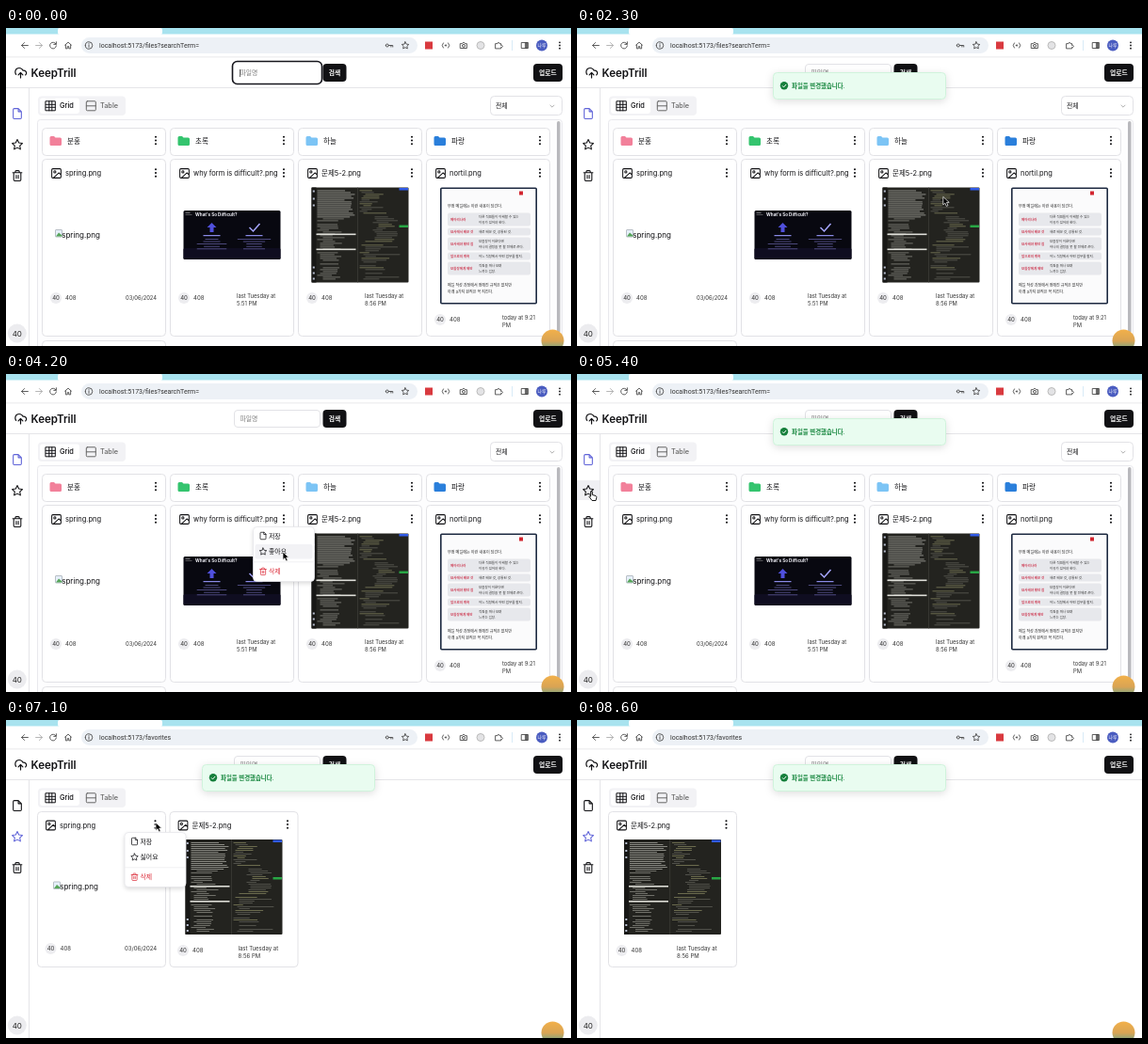
Recreate the animation shown at these times as an HTML page. Size 600x338 px, loop 9000 ms.

```html
<!DOCTYPE html>
<html lang="ko">
<head>
<meta charset="utf-8">
<title>Storage page</title>
<style>
html, body { margin: 0; width: 100%; height: 100%; overflow: hidden; background: #fff; }
svg { display: block; width: 600px; height: 338px; font-family: Inter, "Noto Sans CJK KR", "Noto Sans CJK", sans-serif; }
</style>
</head>
<body>
<svg id="stage" viewBox="0 0 600 338"></svg>
<script>
const LOOP = 9000, STEP = 100;
const INK = '#111114', LINE = '#e2e2e6', SOFT = '#f2f2f5', INDIGO = '#5f63d8', RED = '#dc2f3c';
const stage = document.getElementById('stage');

const rect = (x, y, w, h, fill, r = 0, stroke = 'none', sw = 1) =>
  `<rect x="${x}" y="${y}" width="${w}" height="${h}" rx="${r}" fill="${fill}" stroke="${stroke}" stroke-width="${sw}"/>`;
const circle = (x, y, r, fill, stroke = 'none') =>
  `<circle cx="${x}" cy="${y}" r="${r}" fill="${fill}" stroke="${stroke}"/>`;
const text = (x, y, s, size = 7.5, fill = INK, weight = 400, extra = '') =>
  `<text x="${x}" y="${y}" font-size="${size}" fill="${fill}" font-weight="${weight}" ${extra}>${s}</text>`;
const mid = 'text-anchor="middle"';
const group = (x, y, body, extra = '') => `<g transform="translate(${x} ${y})" ${extra}>${body}</g>`;

// Line icons on a 24 unit grid
const ICONS = {
  upload: 'M4 15a7 7 0 1 1 12-7h2a4.5 4.5 0 0 1 2.5 8M12 12v9M8 16l4-4 4 4',
  file: 'M14 2H6a2 2 0 0 0-2 2v16a2 2 0 0 0 2 2h12a2 2 0 0 0 2-2V8zV8h6',
  star: 'M12 2l3.1 6.3 6.9 1-5 4.9 1.2 6.8-6.2-3.2L5.8 21 7 14.2 2 9.3l6.9-1z',
  trash: 'M3 6h18M19 6v14a2 2 0 0 1-2 2H7a2 2 0 0 1-2-2V6M8 6V4a2 2 0 0 1 2-2h4a2 2 0 0 1 2 2v2M10 11v6M14 11v6',
  image: 'M5 3h14a2 2 0 0 1 2 2v14a2 2 0 0 1-2 2H5a2 2 0 0 1-2-2V5a2 2 0 0 1 2-2zM7 9a2 2 0 1 0 4 0a2 2 0 1 0-4 0M21 15l-4-4L6 21',
  grid: 'M2 2h20v20H2zM2 9h20M2 15h20M9 2v20M15 2v20',
  rows: 'M4 2h16a2 2 0 0 1 2 2v16a2 2 0 0 1-2 2H4a2 2 0 0 1-2-2V4a2 2 0 0 1 2-2zM2 12h20',
  down: 'M5 9l7 7 7-7',
  back: 'M21 12H3M11 4l-8 8 8 8',
  next: 'M3 12h18M13 4l8 8-8 8',
  reload: 'M20 8a9 9 0 1 0 1 5M21 2v7h-7',
  home: 'M3 11l9-8 9 8M5 10v11h5v-6h4v6h5V10',
  info: 'M2 12a10 10 0 1 0 20 0a10 10 0 1 0-20 0M12 11v6M12 7v1',
  key: 'M2 12a4 4 0 1 0 8 0a4 4 0 1 0-8 0M10 12h12v4M17 12v4',
  camera: 'M3 7h5l2-3h4l2 3h5v13H3zM8 13a4 4 0 1 0 8 0a4 4 0 1 0-8 0',
  puzzle: 'M4 7h5a3 3 0 1 1 6 0h4v5a3 3 0 1 1 0 5v4H4z',
  panel: 'M3 4h18v16H3zM13 4v16M16 4v16M19 4v16',
  signal: 'M5 5a10 10 0 0 0 0 14M19 5a10 10 0 0 1 0 14M10 12a2 2 0 1 0 4 0a2 2 0 1 0-4 0'
};
const icon = (name, cx, cy, size, color = INK, sw = 2) =>
  `<path d="${ICONS[name]}" transform="translate(${cx - size / 2} ${cy - size / 2}) scale(${size / 24})" ` +
  `fill="none" stroke="${color}" stroke-width="${sw}" stroke-linecap="round" stroke-linejoin="round"/>`;
const dots = (x, y, gap = 3.7, r = 1.05) => [-1, 0, 1].map(i => circle(x, y + i * gap, r, INK)).join('');

function random(seed) {
  return () => (seed = seed * 16807 % 2147483647) / 2147483647;
}

// Thumbnails
function codeShot() {
  const rnd = random(77);
  let s = rect(0, 0, 103, 101, '#23231f', 1) + rect(0, 0, 5, 101, '#181816') + rect(48.5, 0, 0.6, 101, '#44443f');
  for (let y = 3; y < 98; y += 2) {
    const indent = y < 32 ? 0 : 3 * (rnd() * 3 | 0);
    if (rnd() < 0.88) s += rect(6 + indent, y, (y < 32 ? 28 : 12) + rnd() * 12, 0.8, y < 32 ? '#a5a59e' : '#85857e');
    if (y < 26 || rnd() < 0.8) {
      const far = y > 30 && y < 56 ? 14 : 0;
      s += rect(51 + far + 2 * (rnd() * 4 | 0), y, 8 + rnd() * (y > 56 ? 32 : 17), 0.7, rnd() < 0.2 ? '#8a8a64' : '#65655d');
    }
  }
  for (const y of [49, 65]) s += rect(5, y, 42, 1.6, '#deded8');
  for (const y of [3, 11, 18, 84, 90, 96]) s += rect(1.3, y, 2, 2, '#b8bfd0');
  return s + rect(93, 0.5, 9.5, 2.5, '#315be8') + rect(93, 40, 9.5, 2.5, '#28a745');
}

function slideShot() {
  const rnd = random(9);
  let s = rect(0, 0, 103, 52, '#080810', 1.5) + rect(0, 40, 103, 12, '#0f0d20', 1.5) +
    text(12.5, 6, "What's So Difficult?", 4.6, '#f2f2f8', 700) + rect(2, 2, 5, 0.7, '#aaa') + rect(2, 4, 7, 0.7, '#777');
  [30, 75].forEach((x, i) => {
    s += i ? `<path d="M${x - 5} 18l4 4 7-8" fill="none" stroke="#a7a7ff" stroke-width="1.5"/>`
      : `<path d="M${x} 13l5 5h-3v5h-4v-5h-3z" fill="#5050dc"/>`;
    s += rect(x - 9, 26, 18, 1.2, '#8b8be8');
    for (let y = 30; y < 42; y += 2.6) {
      const w = 14 + rnd() * 22;
      s += rect(x - w / 2, y, w, 0.8, '#5c5896');
    }
  });
  return s;
}

function letterShot() {
  let s = rect(0.8, 0.8, 101.4, 122.4, '#fbfbfc', 1, '#1c2940', 1.6) + rect(84, 4, 4, 4, '#d22630') +
    text(8, 21, '부정 메일에는 이런 내용이 담긴다.', 4.1, '#222', 500);
  [[27, 14, '메아리나라', '다른 직원들이 이해할 수 있는', '이유가 있어야 한다.'],
   [43, 8, '묘사에서 배운 것', '새로 배운 것, 공통된 것.'],
   [53, 14, '묘사해야 했던 점', '모둠장이 이룬다면', '하나의 결정을 못 할 전제로 쓴다.'],
   [69, 8, '앞으로의 계획', '어느 직장에서 어떤 업무를 할지.'],
   [79, 14, '모둠장에게 제안', '직원을 떠나 보며', '느끼는 입장.']]
    .forEach(([y, h, label, ...lines]) => {
      s += rect(8, y, 88, h, '#e7e8ec', 2) + text(11, y + h / 2 + 1.4, label, 3.5, '#cf4058', 600);
      lines.forEach((l, i) => s += text(41, y + 5.4 + i * 5.6, l, 3.5, '#333'));
    });
  return s + text(8, 105, '메일 작성 과정에서 정해진 규칙은 없지만', 4, '#222', 500) +
    text(8, 112.5, '아래 3가지 원칙은 꼭 지킨다.', 4, '#222', 500);
}

const brokenShot = rect(0.5, 0.5, 7, 7.5, '#e7f0fb', 0.5, '#a9b0b8', 0.8) +
  `<path d="M1 7.5l3-4 3.5 3v1z" fill="#57a65a"/>` + text(7.2, 8.6, 'spring.png', 8, INK);
const shots = { code: codeShot(), slide: slideShot(), letter: letterShot(), broken: brokenShot };

const titleRow = (x, y, name) => icon('image', x, y, 13, INK, 1.9) + text(x + 9.5, y + 2.7, name);
const owner = (x, y, date, dx, size) => circle(x, y, 6, '#ededf0') + text(x, y + 2.2, '40', 6, '#333', 400, mid) +
  text(x + 10, y + 2.3, '408', 6, '#333') +
  date.map((d, i) => text(dx, y + (date.length > 1 ? 0 : 2.2) + i * 8, d, size, '#333')).join('');
const card = (x, y, w, h) => rect(x + 0.5, y + 0.5, w, h, '#fff', 4, LINE);

// Pages
function filesPage() {
  let s = rect(514.5, 72.5, 76, 20, '#fff', 4, LINE) + text(520, 85, '전체', 6.8) + icon('down', 580, 83, 7, '#777') +
    rect(33.5, 97.5, 557, 260, '#fdfdfe', 3, '#e9e9ed') + rect(585, 99, 3.5, 225, '#b9b9bd', 1.7);
  ['분홍 #f2809a', '초록 #34c46e', '하늘 #7cc4f5', '파랑 #2a7fdb'].forEach((f, i) => {
    const [name, color] = f.split(' '), x = 38 + 136 * i;
    s += card(x, 106, 131, 29) + `<path d="M${x + 8.5} 116.5q0-1.5 1.5-1.5h3l1.5 1.5h5q1.5 0 1.5 1.5v5.5q0 1.5-1.5 1.5h-9.5q-1.5 0-1.5-1.5z" fill="${color}"/>` +
      text(x + 27, 122.8, name) + dots(x + 121, 119.5);
  });
  [['spring.png', 'broken', 52, 214, ['03/06/2024'], 127],
   ['why form is difficult?.png', 'slide', 188.5, 194, ['last Tuesday at', '5:51 PM'], 245],
   ['문제5-2.png', 'code', 324.5, 169.5, ['last Tuesday at', '8:56 PM'], 381],
   ['nortil.png', 'letter', 461, 169.5, ['today at 9:21', 'PM'], 527]]
    .forEach(([name, shot, sx, sy, date, dx], i) => {
      const x = 38 + 136 * i;
      s += card(x, 139, 131, 188) + titleRow(x + 15.5, 154.5, name) + dots(x + 121, 154) +
        group(sx, sy, shots[shot]) + owner(x + 15, i == 3 ? 310 : 287, date, dx, 5.8);
    });
  return s + card(38, 332, 131, 40);
}

function favoritesPage(springGone) {
  let s = '', x = 33;
  if (!springGone) {
    s += card(33, 97, 136, 165) + titleRow(47.5, 112, 'spring.png') + dots(158.5, 111) +
      group(50, 171.5, shots.broken) + owner(47.5, 243, ['03/06/2024'], 126, 6);
    x = 173.5;
  }
  return s + card(x, 97, 136, 165) + titleRow(x + 14.5, 112, '문제5-2.png') + dots(x + 125.5, 111) +
    group(x + 17, 127, shots.code) + owner(x + 14.5, 245, ['last Tuesday at', '8:56 PM'], x + 73, 6);
}

function browser(path) {
  let s = rect(0, 0, 600, 7, '#a8e3ef') + rect(55, 0, 111, 7, '#fff', 2) + rect(0, 6.5, 600, 25, '#fff') +
    rect(80, 10, 357, 17, '#edf1f6', 8.5) + rect(0, 30.5, 600, 0.8, '#e3e3e6');
  [['back', 20], ['next', 35, '#aaa'], ['reload', 50], ['home', 66], ['info', 88], ['key', 407], ['star', 424],
   ['signal', 467], ['camera', 486], ['puzzle', 523], ['panel', 551]]
    .forEach(([n, x, c = '#444']) => s += icon(n, x, 18.5, 9, c, 2.3));
  return s + rect(445, 14.5, 8, 8, '#d93a3f') + circle(504, 18.5, 4, '#e3e3e5', '#bbb') +
    rect(537, 13, 0.8, 11, '#cfe6f5') + circle(569, 18.5, 6, '#4a5cc0') + text(569, 20.4, '나루', 4.8, '#fff', 400, mid) +
    dots(588, 18.5, 3.2, 0.9) + text(99, 21.2, 'localhost:5173/' + path, 7, '#333', 400, 'font-family="Roboto, sans-serif"');
}

function shell(focus, favorites, starHover) {
  let s = icon('upload', 15.5, 47.5, 14.5) + text(26.5, 51.8, 'KeepTrill', 11.5, INK, 600);
  s += focus ? rect(240.5, 35.5, 95, 24, '#fff', 5, '#15151c', 1.6) + rect(248, 44, 0.7, 8, '#222')
    : rect(242.5, 38.5, 91, 18, '#fff', 3.5, LINE);
  s += text(248.5, 50, '파일명', 6.8, '#777') + rect(336.5, 38, 25, 19, INK, 4) + text(349, 50, '검색', 6.8, '#fff', 600, mid) +
    rect(560, 38, 31, 19, INK, 4) + text(575.5, 50, '업로드', 6.8, '#fff', 600, mid) +
    rect(0, 63, 600, 0.9, LINE) + rect(24, 64, 0.9, 274, LINE);
  if (starHover) s += rect(0, 113, 24, 21, '#efeff3');
  s += icon('file', 12, 91, 13, favorites ? INK : INDIGO) + icon('star', 12, 124, 13, favorites ? INDIGO : INK) +
    icon('trash', 12, 157, 13) + circle(11.8, 324.5, 10, '#ececef') + text(11.8, 327.5, '40', 8, '#222', 400, mid);
  return s + rect(34, 72.5, 93, 20.5, SOFT, 4) + rect(36, 74.5, 42, 16.5, '#fff', 3) +
    icon('grid', 47.3, 82.8, 12) + text(57, 85.4, 'Grid', 7.4, INK, 500) +
    icon('rows', 90.3, 82.8, 12, '#666') + text(100, 85.4, 'Table', 7.3, '#666', 500);
}

function menu(cx, cy, like, hover) {
  const row = (name, y, label, color = INK) => icon(name, 10.5, y, 9, color) + text(16.5, y + 2.5, label, 6.9, color);
  return group(cx - 32.5, cy + 8.5, rect(0, 0, 65, 58, '#fff', 4, '#e6e6ea', 0.8) +
    (hover ? rect(2, 18.5, 61, 15.5, SOFT, 2) : '') + row('file', 9.5, '저장') + row('star', 26.2, like) +
    rect(0, 37, 65, 0.7, '#ebebee') + row('trash', 47.3, '삭제', RED), 'filter="drop-shadow(0 2px 2px #0002)"');
}

const toast = p => group(208, 47 - 29 * (1 - p), rect(0.5, 0.5, 183, 28, '#e9fcf0', 4, '#d0f3dc') +
  circle(12, 14.3, 4.2, '#16803c') + '<path d="M10 14.4l1.5 1.5 2.7-3" fill="none" stroke="#fff"/>' +
  text(20, 16.6, '파일을 변경했습니다.', 6.4, '#14853c', 600), `opacity="${p}" filter="drop-shadow(0 2px 4px #0002)"`);

const arrow = '<path d="M0 0v8.5l2-1.8 1.5 3.3 1.7-.8-1.5-3.2h2.7z" fill="#000" stroke="#fff" stroke-width=".7"/>';
const hand = '<path d="M1 0q1.2-.5 1.4 1v3l3.6 1q1 .5.7 2l-.7 3h-4l-3-4q0-1.2 1.5-.3z" fill="#fff" stroke="#000" stroke-width=".9"/>';

// Timeline
const PATH = [[100, 300, 50], [800, 430, 152], [1100, 430, 152], [1300, 422, 189], [2100, 422, 189], [2700, 294, 152],
  [3000, 294, 152], [3200, 293, 187.5], [4100, 293, 187.5], [4200, 294, 189], [4700, 294, 189], [5200, 14, 124.5],
  [5700, 14, 124.5], [6500, 159, 114], [6600, 159, 109], [7100, 159, 109], [7400, 152, 143], [7900, 152, 143], [8600, 604, 200]];
const MENUS = [[900, 1400, 431, 154, '좋아요'], [2800, 4600, 295, 154, '좋아요'], [6900, 7800, 158.5, 111, '싫어요']];
const TOASTS = [[1400, 3900], [4600, 7200], [7900, LOOP]];
const FADE = 300;

function pointer(t) {
  const i = PATH.findIndex(k => t < k[0]);
  if (i < 1) return null;
  const [t0, x0, y0] = PATH[i - 1], [t1, x1, y1] = PATH[i];
  const u = (t - t0) / (t1 - t0), e = u * u * (3 - 2 * u);
  return { x: x0 + (x1 - x0) * e, y: y0 + (y1 - y0) * e };
}

function scene(t) {
  const favorites = t >= 5500, at = pointer(t);
  const starHover = at && at.x < 24 && at.y > 113 && at.y < 134;
  let s = rect(0, 0, 600, 338, '#fff') + browser(favorites ? 'favorites' : 'files?searchTerm=') +
    shell(t < 900, favorites, starHover) + (favorites ? favoritesPage(t >= 8200) : filesPage());
  for (const [from, to, x, y, like] of MENUS)
    if (t >= from && t < to) s += menu(x, y, like, at.y > y + 26 && at.y < y + 43);
  for (const [from, to] of TOASTS) {
    const p = Math.min(1, (t - from) / FADE, (to + FADE - t) / FADE);
    if (p > 0) s += toast(p);
  }
  s += '<defs><linearGradient id="dusk" x2="0" y2="1"><stop stop-color="#f2b04a"/><stop offset=".5" stop-color="#d9a454"/>' +
    '<stop offset="1" stop-color="#4fa79a"/></linearGradient></defs>' + circle(580.5, 332.5, 12, 'url(#dusk)');
  return at ? s + group(at.x, at.y, starHover ? hand : arrow) : s;
}

let shown = -1;
function tick() {
  const t = Math.floor(performance.now() % LOOP / STEP) * STEP;
  if (t !== shown) stage.innerHTML = scene(shown = t);
  requestAnimationFrame(tick);
}
tick();
</script>
</body>
</html>
```
